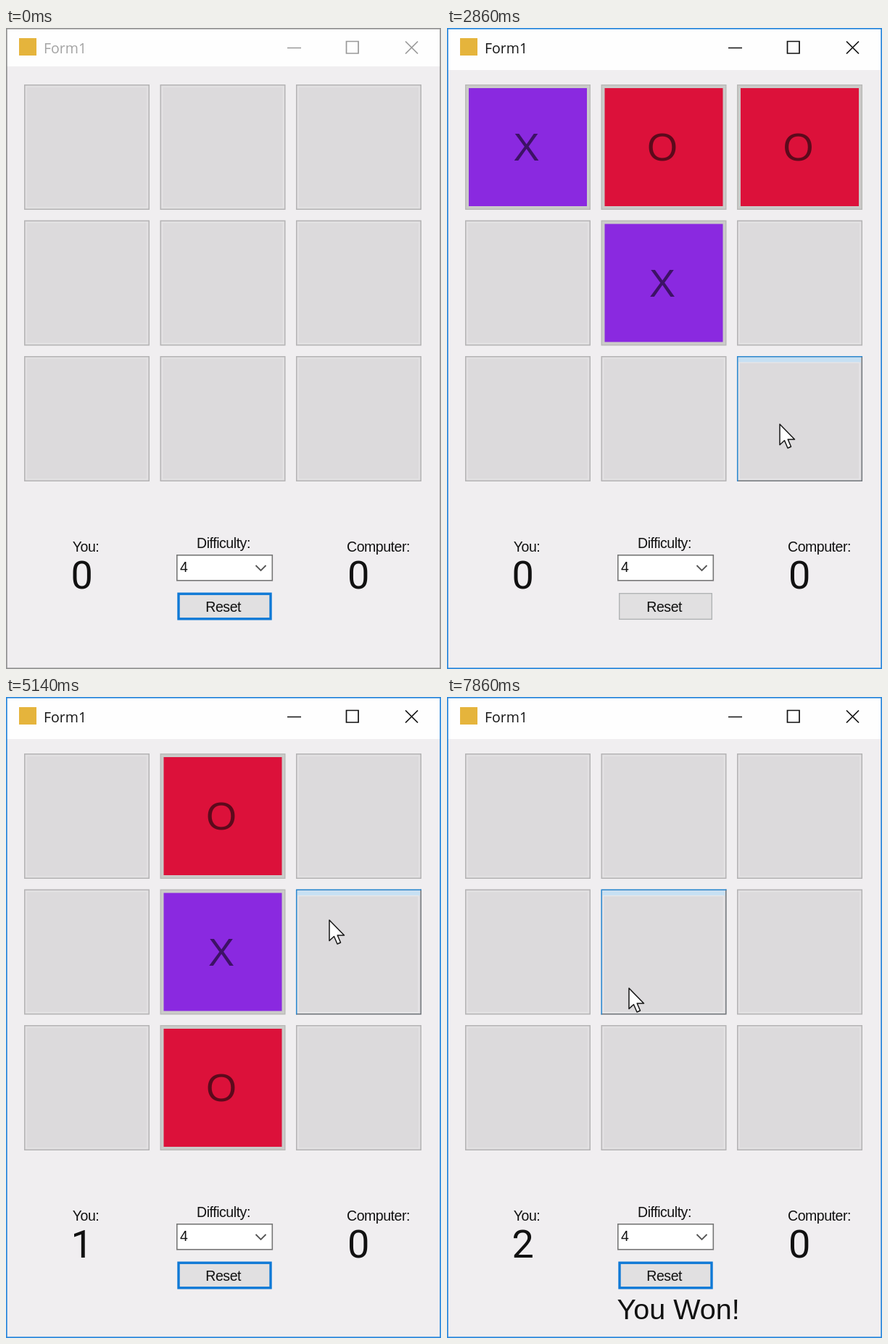
Write an HTML page that moves like this. It is 600 px wide and 885 px high and loops after 8 s.

```html
<!DOCTYPE html>
<html lang="en">
<head>
<meta charset="utf-8">
<title>Noughts and crosses</title>
<style>
html, body { margin: 0; width: 100%; height: 100%; overflow: hidden; background: #f0eef0; }
svg { display: block; width: 100%; height: 100%; }
text { font-family: "Liberation Sans", Arial, sans-serif; fill: #111; }
.title { font: 19.5px "Open Sans", sans-serif; fill: #a3a3a3; }
.small { font-size: 19.5px; letter-spacing: -.45px; }
.label { text-anchor: middle; }
.big { font-size: 54px; }
.score { font: 54px Roboto, sans-serif; }
.won { font-size: 39.5px; }
.frame { fill: none; stroke: #929292; stroke-width: 2; }
.controls { fill: none; stroke: #999; stroke-width: 1.7; }
.active .title { fill: #161616; }
.active .frame { stroke: #2987dc; }
.active .controls { stroke: #111; }
</style>
</head>
<body>
<svg id="form" viewBox="0 0 600 885">
  <rect width="600" height="885" fill="#f0eef0"/>
  <rect id="bar" width="600" height="53" fill="#fefefe"/>
  <rect class="frame" x="0.7" y="0.7" width="598.6" height="883.6"/>
  <rect x="18" y="14" width="24" height="24" fill="#e5b43c"/>
  <text class="title" x="52" y="35">Form1</text>
  <path class="controls" d="M388 27.5H407M469.5 18.5H486V35H469.5ZM551 18.5L568 35.5M568 18.5L551 35.5"/>
  <g id="board"></g>
  <text class="small label" x="110" y="723">You:</text>
  <text class="score" id="score" x="89.5" y="774">0</text>
  <text class="small label" x="513.5" y="723">Computer:</text>
  <text class="score" x="471" y="774">0</text>
  <text class="small label" x="300" y="718">Difficulty:</text>
  <rect x="235.8" y="727.8" width="131.5" height="35" fill="#fff" stroke="#777" stroke-width="1.6"/>
  <text class="small" x="240" y="751">4</text>
  <path d="M344.5 742L351.5 749L358.5 742" fill="none" stroke="#555" stroke-width="1.8"/>
  <rect id="reset" fill="#e1e0e1"/>
  <text class="small label" x="299.7" y="806">Reset</text>
  <text class="won" id="won" x="234.5" y="859">You Won!</text>
  <path id="cursor" d="M0 0V28.5L6.5 22.5L11 33L15.5 31L11.2 21H20.5Z"
    fill="#fff" stroke="#161616" stroke-width="1.5" stroke-linejoin="round"/>
</svg>
<script>
const FPS = 7, STEPS = 56;
const $ = id => document.getElementById(id);

// [step, board]
const moves = [
  [0, '.........'], [12, 'X........'], [13, 'XO.......'], [17, 'XO..X....'],
  [18, 'XOO.X....'], [21, 'XOO.X...X'], [22, '.........'], [25, '.O.......'],
  [33, '.O..X....'], [34, '.O..X..O.'], [41, '.OX.X..O.'], [42, 'OOX.X..O.'],
  [50, '.........']
];
// [step, x, y]
const path = [
  [6, 470, 550], [7, 320, 370], [8, 130, 200], [9, 83, 145], [13, 83, 145],
  [15, 220, 315], [16, 251, 343], [18, 251, 343], [20, 459, 547], [26, 459, 547],
  [30, 300, 345], [34, 300, 345], [36, 446, 308], [39, 480, 170], [42, 480, 170],
  [46, 119, 529], [52, 119, 529], [55, 251, 402]
];
const pieces = {
  X: { fill: '#8a29e0', ink: '#3d1266' },
  O: { fill: '#dc113a', ink: '#5c0a1c' }
};
const face = '#dcdadc';

const between = (n, from, to) => n >= from && n < to;

function cursorAt(step) {
  const i = path.findIndex(p => p[0] >= step);
  if (i < 1) return path[0].slice(1);
  const [t0, x0, y0] = path[i - 1], [t1, x1, y1] = path[i];
  const f = (step - t0) / (t1 - t0);
  return [x0 + (x1 - x0) * f, y0 + (y1 - y0) * f];
}

function cellAt(step) {
  if (step < path[0][0] || between(step, 22, 27)) return -1;
  const [x, y] = cursorAt(step);
  const col = Math.floor((x - 25) / 187.5), row = Math.floor((y - 78) / 187.5);
  const inside = x - 25 - col * 187.5 < 173 && y - 78 - row * 187.5 < 173;
  return inside && between(col, 0, 3) && between(row, 0, 3) ? row * 3 + col : -1;
}

const rect = (x, y, w, h, fill, stroke = 'none', sw = 1.4) =>
  `<rect x="${x}" y="${y}" width="${w}" height="${h}" fill="${fill}" stroke="${stroke}" stroke-width="${sw}"/>`;
const line = (d, color) => `<path d="${d}" fill="none" stroke="${color}" stroke-width="1.5"/>`;

function hoverMarkup(x, y, style) {
  const topLeft = `M${x + .7} ${y + 173}V${y + .7}H${x + 173}`;
  const bottomRight = `M${x + 172.3} ${y}V${y + 172.3}H${x}`;
  if (style === 'full') {
    return rect(x + .7, y + .7, 171.6, 171.6, '#cfe5f5', '#1b7fd2') +
      rect(x + 4, y + 4, 164.5, 164.5, face, '#e4edf4');
  }
  const body = rect(x, y, 173, 173, face);
  if (style === 'late') {
    return body + rect(x + 1, y + 1, 171, 4, '#d0dfda') + rect(x + 167, y + 1, 5, 171, '#d0dfda') +
      line(topLeft, '#53636b') + line(bottomRight, '#427c88');
  }
  return body + rect(x + 2, y + 2, 169, 7, '#c7e0f3') +
    rect(x + 3, y + 9, 166, 161, 'none', '#e7e6e8') +
    line(bottomRight, '#72777c') + line(topLeft, '#2988d2');
}

function cellMarkup(piece, i, hover) {
  const x = 25 + i % 3 * 187.5, y = 78 + Math.floor(i / 3) * 187.5;
  if (piece !== '.') {
    const { fill, ink } = pieces[piece];
    return rect(x + .7, y + .7, 171.6, 171.6, '#cbcbc9', '#b9b9b7') +
      rect(x + 5, y + 5, 163, 163, fill) +
      `<text class="big" x="${x + 84.5}" y="${y + 105}" text-anchor="middle" style="fill:${ink}">${piece}</text>`;
  }
  if (hover) return hoverMarkup(x, y, hover);
  return rect(x + .7, y + .7, 171.6, 171.6, face, '#b3b2b3') +
    rect(x + 3, y + 3, 167, 167, 'none', '#e4e3e4');
}

function setAttrs(el, attrs) {
  for (const name in attrs) el.setAttribute(name, attrs[name]);
}

function draw(step) {
  const board = moves.filter(m => m[0] <= step).pop()[1];
  const hovered = cellAt(step);
  const fresh = hovered !== cellAt(step - 2);
  const style = between(step, 14, 18) ? 'late' : fresh ? 'fresh' : 'full';
  $('board').innerHTML = [...board].map((p, i) => cellMarkup(p, i, i === hovered && style)).join('');

  const active = step >= 12;
  $('form').classList.toggle('active', active);
  $('bar').setAttribute('height', active ? 58 : 53);
  $('score').textContent = step < 22 ? 0 : step < 50 ? 1 : 2;
  $('won').style.display = between(step, 22, 33) || step >= 50 ? '' : 'none';

  const focused = !between(step, 12, 22);
  setAttrs($('reset'), focused
    ? { x: 238, y: 781.2, width: 127, height: 34.6, stroke: '#0f79d6', 'stroke-width': 3.4 }
    : { x: 237.7, y: 780.7, width: 127.6, height: 35.6, stroke: '#b1b3b5', 'stroke-width': 1.4 });

  const [x, y] = cursorAt(step);
  $('cursor').style.display = step < path[0][0] ? 'none' : '';
  $('cursor').setAttribute('transform', `translate(${x} ${y})`);
}

let shown = -1;
function tick() {
  const step = Math.floor(performance.now() * FPS / 1000 + .05) % STEPS;
  if (step !== shown) draw(shown = step);
  requestAnimationFrame(tick);
}
tick();
</script>
</body>
</html>
```
